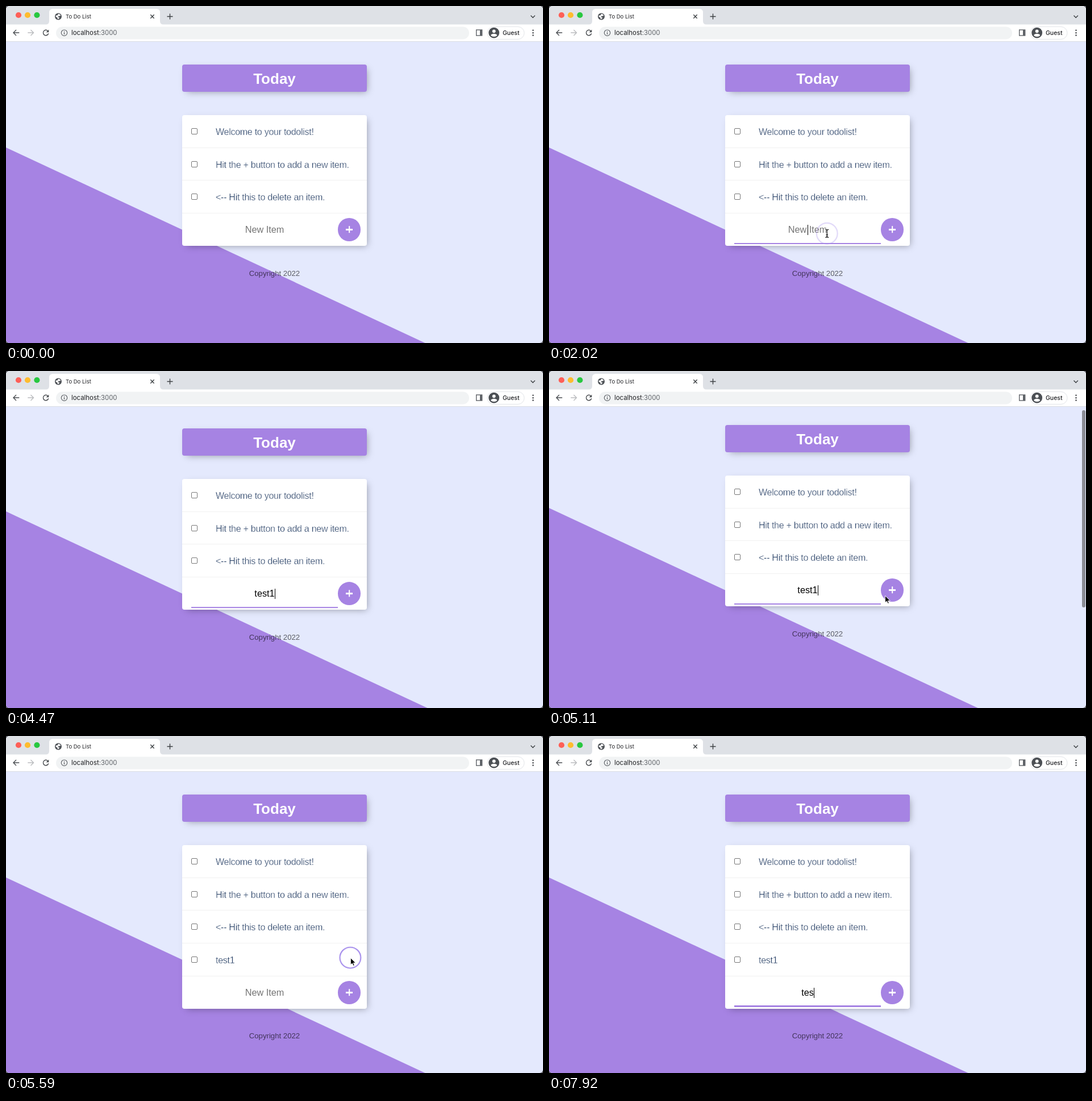
Recreate the animation shown at these times as an HTML page. Size 945 by 593 pixels, loop 8 s.

```html
<!DOCTYPE html>
<html lang="en">
<head>
<meta charset="utf-8">
<title>To Do List</title>
<style>
  html, body { margin: 0; width: 100%; height: 100%; overflow: hidden; background: #55565c; }
  * { box-sizing: border-box; }
  div, svg { position: absolute; }
  #window { width: 945px; height: 593px; overflow: hidden; border-radius: 6px; background: #e4e9fd;
    font-family: "Liberation Sans", Arial, sans-serif; white-space: nowrap; }
  #page { width: 945px; height: 640px; }
  .slope { inset: 0; background: #a683e3; clip-path: polygon(0 249px, 0 620px, 795.500px 620px); }
  .card { left: 310px; width: 325px; border-radius: 4px; box-shadow: 4px 4px 12px -4px rgba(0, 0, 0, .35); }
  .title { top: 103.3px; height: 48.2px; background: #a683e3; color: #fff; text-align: center;
    font: bold 26px/50.5px "Liberation Sans", Arial, sans-serif; }
  #list { top: 192px; background: #fff; }
  .row { left: 0; width: 325px; height: 57.7px; border-bottom: 1px solid #f1f1f1; }
  .row i { position: absolute; left: 16px; top: 23px; width: 11px; height: 11px;
    border: 1px solid #767676; border-radius: 2px; }
  /* The white stroke thins the glyphs to a light weight. */
  .row span { position: absolute; left: 59px; font-size: 16px; line-height: 59.2px;
    letter-spacing: -.27px; color: #2c4469; -webkit-text-stroke: .3px #fff; }
  #form { left: 0; width: 325px; height: 57.7px; }
  .field { left: 16px; width: 258px; height: 57px; text-align: center; font-size: 16.27px; line-height: 57.6px; }
  #hint { color: #757575; }
  #caret { display: inline-block; width: 1px; height: 18px; margin-right: -1px; vertical-align: -4px; background: #000; }
  #underline { left: 16px; top: 51.7px; width: 258px; height: 2.4px; background: #a683e3; }
  .add { left: 273.7px; top: 8.2px; width: 40.8px; height: 40.8px; border-radius: 50%; background: #a683e3; }
  .add::before, .add::after { content: ""; position: absolute; left: 14.4px; top: 19.2px;
    width: 12px; height: 2.4px; background: #fff; }
  .add::after { transform: rotate(90deg); }
  #copyright { left: 310px; width: 325px; text-align: center; font-size: 13.2px; line-height: 20px; color: rgba(0, 0, 0, .6); }
  #scrollbar { left: 937.5px; top: 69px; width: 6px; height: 346.5px; border-radius: 3px; background: #8a8b94; }
  svg { left: 0; top: 0; overflow: visible; }
  svg text { font-family: Inter, Roboto, sans-serif; fill: #202124; }
</style>
</head>
<body>
<div id="window">
  <div id="page">
    <div class="slope"></div>
    <div class="card title">Today</div>
    <div class="card" id="list">
      <div id="form">
        <div class="field" id="hint">New Item</div>
        <div class="field"><span id="value"></span><span id="caret"></span></div>
        <div id="underline"></div>
        <div class="add"></div>
      </div>
    </div>
    <div id="copyright">Copyright 2022</div>
  </div>
  <div id="scrollbar"></div>

  <svg width="945" height="63" fill="none" stroke="#5f6368" stroke-width="1.4">
    <g stroke="none">
      <path fill="#dee1e6" d="M0 0H945V33H0Z"/>
      <path fill="#fff" d="M0 32.5H70Q76 32.5 76 26.5V11.5Q76 5 82.5 5H264.5Q271 5 271 11.5V26.5Q271 32.5 277 32.5H945V62H0Z"/>
      <path fill="#d9dce3" d="M0 62H945V63H0Z"/>
      <circle cx="22" cy="16" r="5.1" fill="#fe5f57"/>
      <circle cx="38" cy="16" r="5.1" fill="#febc2e"/>
      <circle cx="54.4" cy="16" r="5.1" fill="#28c840"/>
      <rect x="88" y="36.5" width="727" height="22" rx="11" fill="#f1f3f4"/>
      <circle cx="92" cy="18.5" r="6" fill="#4f5358"/>
      <path fill="#fff" d="M92 13.7Q95 13.8 96.3 16.5L94.5 17.8 92.5 17.5 91.5 19.5 94 20.2 93.5 22 91 23.2 90.3 20.5 87.3 18.5 88.3 16.5 90.5 16.5Z"/>
      <text x="105" y="22" font-size="9.5">To Do List</text>
      <text x="115" y="51" font-size="11.4">localhost<tspan fill="#5f6368">:3000</tspan></text>
    </g>
    <path d="M254.3 15.3l6.4 6.4m0-6.4l-6.4 6.4M283.5 18.5h10M288.5 13.5v10" stroke="#3c4043"/>
    <path d="M923.5 16.8l3.7 3.7 3.7-3.7" stroke="#3c4043"/>
    <path d="M23.3 47H13M18 42l-5 5 5 5" stroke="#4a4d51"/>
    <path d="M38.3 47H48.5M43.5 42l5 5-5 5" stroke="#babcbf"/>
    <path d="M73.5 43.7A4.7 4.7 0 1 0 74.7 48.2" stroke="#4a4d51"/>
    <path d="M75.3 41.5V46.2H70.6Z" fill="#4a4d51" stroke="none"/>
    <circle cx="102.5" cy="47.2" r="5.2" stroke-width="1.2"/>
    <path d="M102.5 46.3V50M102.5 44V45.3" stroke-width="1.3"/>
    <rect x="827.7" y="42" width="10" height="10"/>
    <path d="M834 42H838V52H834Z" fill="#5f6368" stroke="none"/>
    <rect x="847" y="36.5" width="65" height="22" rx="11" stroke="#e2e4e8" stroke-width="1"/>
    <g stroke="none">
      <circle cx="858.7" cy="47.2" r="9.4" fill="#4b4f54"/>
      <circle cx="858.7" cy="44.3" r="2.9" fill="#fff"/>
      <path d="M853 51.5Q854.5 48.8 858.7 48.8T864.4 51.5Q862.5 54 858.7 54T853 51.5Z" fill="#fff"/>
      <text x="874" y="51" font-size="10.5" font-weight="500">Guest</text>
      <g fill="#4a4d51"><circle cx="927.5" cy="42.8" r="1.3"/><circle cx="927.5" cy="47.2" r="1.3"/><circle cx="927.5" cy="51.6" r="1.3"/></g>
    </g>
  </svg>

  <svg width="945" height="593" fill="none">
    <defs>
      <path id="beamShape" d="M-3-7Q0-7 0-5V5Q0 7-3 7M3-7Q0-7 0-5M0 5Q0 7 3 7M-1.8 2.5H1.8"/>
    </defs>
    <g id="pointer">
      <g id="ring">
        <circle r="17.3" stroke="#a683e3" stroke-width="2" opacity=".18"/>
        <circle r="18.5" stroke="#a48cec" stroke-width="1.9"/>
      </g>
      <path id="arrow" d="M.5 .5V12.5L3.4 10 5.4 14.3 7.3 13.4 5.4 9.2H9.3Z" fill="#000" stroke="#fff" stroke-width=".9"/>
      <g id="beam">
        <use href="#beamShape" stroke="#fff" stroke-width="2.6"/>
        <use href="#beamShape" stroke="#000" stroke-width="1.2"/>
      </g>
    </g>
  </svg>
</div>

<script>
const LOOP = 8000, ROW = 57.7, RELOAD = 5590;
const ITEMS = ["Welcome to your todolist!", "Hit the + button to add a new item.",
  "<-- Hit this to delete an item.", "test1"];
const FIRST_KEYS = [2820, 2980, 3390, 3470, 3970];
const SECOND_KEYS = [7430, 7670, 7920];
const CLICKS = [1540, 5430, 6470];
const PATH = [[820, 938, 478], [900, 870, 385], [980, 790, 316], [1060, 700, 292], [1140, 612, 314],
  [1220, 542, 360], [1300, 501, 393], [1380, 490, 402], [1540, 490, 401], [2180, 489, 400],
  [4710, 489, 400], [4870, 532, 399], [5110, 591, 395], [5350, 606, 390], [5590, 606, 390],
  [5750, 592, 402], [5990, 535, 435], [6190, 498, 451], [6310, 489, 453]];
const SCROLL = [[4400, 0], [4470, 1.8], [4550, 8]];
const BAR = [[4500, 0], [4550, 1], [5200, 1], [5480, 0]];

const el = id => document.getElementById(id);
const show = (id, on) => { el(id).style.visibility = on ? "visible" : "hidden"; };

const rows = ITEMS.map((text, i) => {
  const row = document.createElement("div");
  const label = document.createElement("span");
  row.className = "row";
  row.style.top = i * ROW + "px";
  label.textContent = text;
  row.append(document.createElement("i"), label);
  el("list").append(row);
  return row;
});

// Linear interpolation over [time, ...values] points.
function along(points, t, column = 1) {
  const next = points.findIndex(p => p[0] > t);
  if (next < 0) return points[points.length - 1][column];
  if (next === 0) return points[0][column];
  const a = points[next - 1], b = points[next];
  return a[column] + (b[column] - a[column]) * (t - a[0]) / (b[0] - a[0]);
}

function draw(t) {
  const reloaded = t >= RELOAD;
  const count = reloaded ? 4 : 3;
  const keys = reloaded ? SECOND_KEYS : FIRST_KEYS;
  const text = (reloaded ? "test2" : "test1").slice(0, keys.filter(k => k <= t).length);
  const focused = t >= CLICKS[0] && t < CLICKS[1] || t >= CLICKS[2];
  const lastInput = Math.max(0, ...[...CLICKS, ...keys].filter(k => k <= t));

  rows[3].style.display = reloaded ? "" : "none";
  el("list").style.height = ROW * (count + 1) - .5 + "px";
  el("form").style.top = ROW * count + "px";
  el("copyright").style.top = 460.5 + ROW * (count - 3) + "px";
  el("page").style.transform = `translateY(${reloaded ? 0 : -along(SCROLL, t)}px)`;
  el("scrollbar").style.opacity = along(BAR, t);

  el("value").textContent = text;
  show("hint", !text);
  show("underline", focused);
  show("caret", focused && (t - lastInput) % 1000 <= 510);

  const x = along(PATH, t, 1), y = along(PATH, t, 2);
  const moving = t >= 820 && t < FIRST_KEYS[0] || t >= 4710 && t < SECOND_KEYS[0];
  const age = t - Math.max(-LOOP, ...CLICKS.filter(c => c <= t));
  el("pointer").setAttribute("transform", `translate(${x} ${y})`);
  el("pointer").style.display = moving ? "" : "none";
  el("arrow").style.display = x < 585 ? "none" : "";
  el("beam").style.display = x < 585 ? "" : "none";
  el("ring").style.opacity = Math.min(1, Math.max(0, (600 - age) / 350));
}

const start = performance.now();
function tick() {
  draw((performance.now() - start) % LOOP);
  requestAnimationFrame(tick);
}
tick();
</script>
</body>
</html>
```
